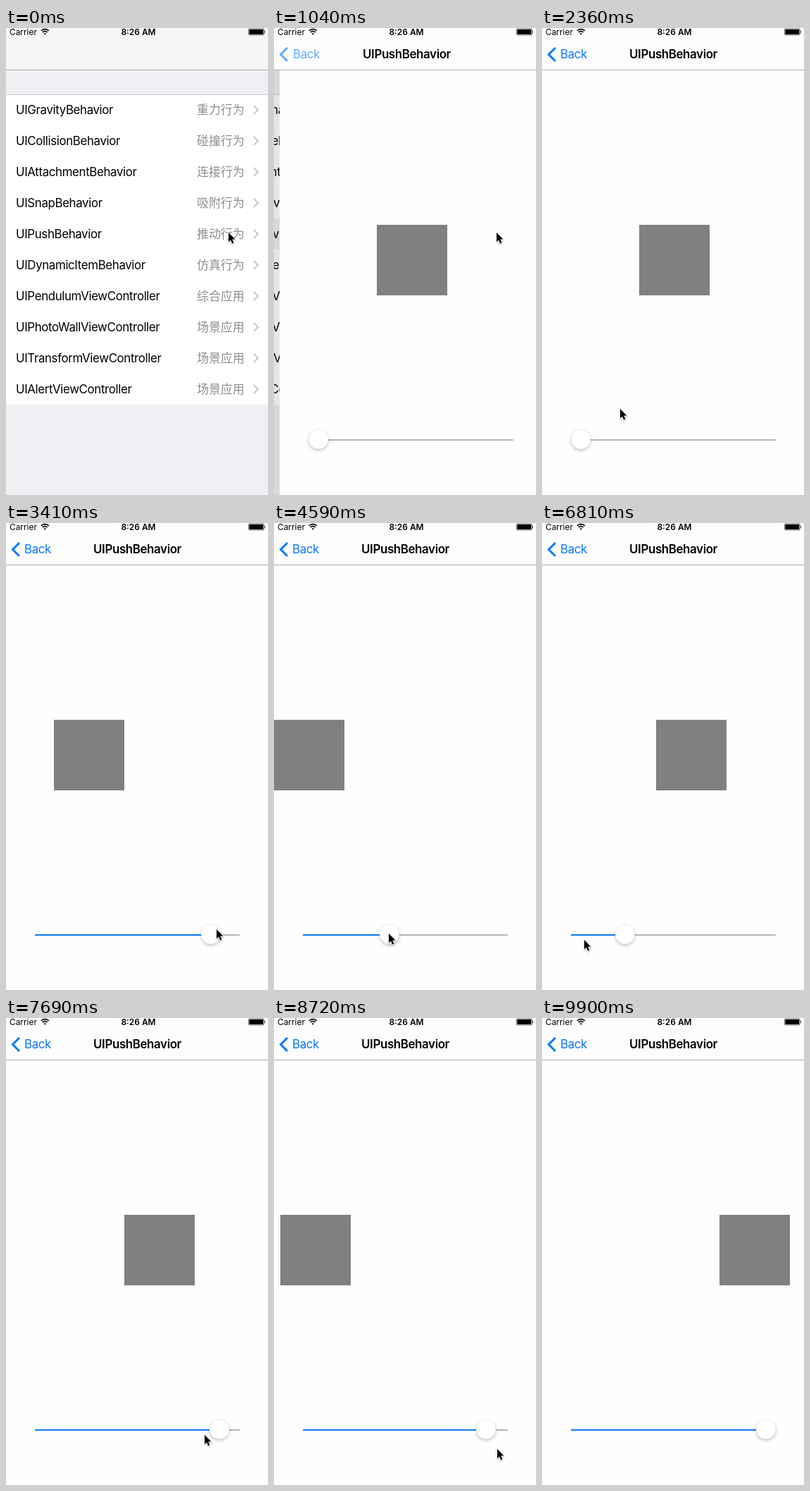
An HTML page that plays this animation: 372x662 px, repeating every 10000 ms.

```html
<!DOCTYPE html>
<html lang="zh-CN">
<head>
<meta charset="utf-8">
<title>Push behavior</title>
<style>
  html, body { margin: 0; width: 100%; height: 100%; overflow: hidden; background: #efeff4; }
  svg { display: block; width: 372px; height: 662px; }
  text { font: 16.9px Inter, "Noto Sans CJK SC", "Noto Sans CJK", sans-serif; letter-spacing: -.38px; }
  .detail { font-family: "Noto Sans CJK SC", "Noto Sans CJK", sans-serif; fill: #8e8e93; letter-spacing: 0; }
  .status { font-size: 11.9px; letter-spacing: 0; }
  .bold { font-weight: 600; }
  .mid { text-anchor: middle; }
  .blue { fill: #0a7aff; }
  .line { fill: none; stroke-width: 2; }
  #thumb { filter: drop-shadow(0 2px 2px rgba(0, 0, 0, .22)); }
  #cursor { filter: drop-shadow(0 1px 1px rgba(0, 0, 0, .3)); }
</style>
</head>
<body>
<svg viewBox="0 0 372 662">
  <g id="list">
    <rect width="372" height="662" fill="#efeff4"/>
    <rect y="94" width="372" height="1" fill="#c8c7cc"/>
    <rect y="95" width="372" height="439" fill="#fff"/>
    <rect id="picked" y="270" width="372" height="44" fill="#efefef"/>
    <g id="rows"></g>
  </g>
  <rect id="dim" width="372" height="662"/>

  <g id="page">
    <rect width="372" height="662" fill="#fefefe"/>
    <rect id="box" y="279" width="100" height="100" fill="#808080"/>
    <rect x="41" y="583" width="291" height="2" rx="1" fill="#b6b6b6"/>
    <rect id="fill" class="blue" x="41" y="583" height="2" rx="1"/>
    <g id="thumb">
      <circle cy="583" r="14" fill="#fff" stroke="#000" stroke-opacity=".1" stroke-width=".6"/>
    </g>
  </g>

  <rect width="372" height="59" fill="#f6f6f7"/>
  <rect id="bar" width="372" height="59" fill="#fdfdfd"/>
  <rect y="59" width="372" height="1" fill="#acacae"/>
  <g id="back">
    <path d="M19 28L9.5 37.5L19 47" class="line" stroke="#0a7aff" style="stroke-width:3"/>
    <text id="backText" class="blue" x="26" y="43">Back</text>
  </g>
  <text id="title" class="bold mid" x="186.5" y="43">UIPushBehavior</text>

  <text class="status" x="5" y="9.5">Carrier</text>
  <g class="line" stroke="#000" style="stroke-width:1.7">
    <path d="M49.8 3.8a7.8 7.8 0 0 1 11 0M51.9 6.1a4.8 4.8 0 0 1 6.8 0"/>
    <path d="M55.3 9.8l-1.7-1.7a2.4 2.4 0 0 1 3.4 0z" fill="#000" stroke="none"/>
  </g>
  <text class="status bold mid" x="188" y="9.5">8:26 AM</text>
  <rect x="344.3" y="1" width="22" height="9" rx="1.5" fill="none" stroke="#000" stroke-width=".6"/>
  <rect x="345.3" y="2" width="20" height="7" rx=".8"/>
  <path d="M367 3.6q1.8 1.9 0 3.8z"/>

  <path id="cursor" d="M0 0V13.2L3 10.4L5.1 15.6L7.4 14.6L5.2 9.6H9.4Z" stroke="#fff" stroke-width="1.4" paint-order="stroke"/>
</svg>
<script>
const LOOP = 10000, HOLD = 739, TICK = 147.6; // the picture steps once per tick
const WALL = 272;                              // travel of the square
const MIN = 55, MAX = 318;                     // travel of the thumb
const GRAB = 11.2, SWING = 19.8, PERIOD = 8.7, PEAK = 37.47, STOP = 54.5;
const $ = id => document.getElementById(id);

const names = ['Gravity', 'Collision', 'Attachment', 'Snap', 'Push', 'DynamicItem',
  'Pendulum', 'PhotoWall', 'Transform', 'Alert'];
const details = ['重力', '碰撞', '连接', '吸附', '推动', '仿真', '综合', '场景', '场景', '场景'];

$('rows').innerHTML = names.map((name, i) => {
  const y = 122 + 44 * i;
  const [kind, use] = i < 6 ? ['Behavior', '行为'] : ['ViewController', '应用'];
  return `<text x="14" y="${y}">UI${name}${kind}</text>
    <text class="detail" x="271" y="${y}">${details[i]}${use}</text>
    <path class="line" stroke="#c7c7cc" d="M351.8 ${y - 12}l6 6l-6 6"/>`;
}).join('');

const clamp = (v, lo = 0, hi = 1) => Math.min(hi, Math.max(lo, v));
const lerp = (a, b, u) => a + (b - a) * u;
const ease = (n, from, to) => (1 - Math.cos(Math.PI * clamp((n - from) / (to - from)))) / 2;
const bounce = d => WALL - Math.abs(WALL - d % (2 * WALL));

// Drift to the left wall, speed up to the right one, then bounce between both.
function boxX(n) {
  if (n < 26) return 138 * clamp((26 - n) / 14) ** 1.26;
  if (n < 39) return Math.min(WALL, 12.6 * (n - 26) + .86 * (n - 26) ** 2);
  return bounce(WALL + 55 * Math.min(n - 39, 16) + 32.6 * Math.max(0, n - 55));
}

const swing = (n, mid, reach, lead) =>
  mid + reach * Math.cos(2 * Math.PI * (Math.min(n, STOP) + lead - PEAK) / PERIOD);

function thumbX(n) {
  if (n < SWING) return lerp(MIN, MAX, ease(n, GRAB, SWING));
  return clamp(swing(n, 210.5, 111.7, 0), MIN, MAX);
}

// The pointer fetches the thumb, swings slightly ahead of it and leaves below.
function pointer(n) {
  if (n < GRAB) {
    const u = ease(n, 7, GRAB);
    return [lerp(316, MIN + 8, u), lerp(290, 598, u)];
  }
  if (n < SWING) return [thumbX(n) + 8, lerp(598, 573, ease(n, GRAB, SWING))];
  const y = Math.min(591, 573 + 1.4 * (n - SWING));
  return [swing(n, 189.3, 137.9, .33), y + 80 * ease(n, 53, 56)];
}

const move = (id, x, y = 0) => $(id).setAttribute('transform', `translate(${x} ${y})`);
const fade = (id, v) => $(id).setAttribute('opacity', v);

function draw(n) {
  const open = n >= 0;
  const t = n * TICK / 1000 + .02;
  const w = 18.26 * t;
  const p = open ? (1 + w) * Math.exp(-w) : 1; // critically damped slide

  move('page', Math.round(372 * p));
  move('list', open ? Math.round(-.3 * 372 * (1 - p)) : 0);
  fade('picked', open ? 1 : 0);
  fade('dim', .1 * (1 - p));
  fade('bar', 1 - p);
  fade('back', open ? Math.min(1, t / .5) : 0);
  fade('title', 1 - p);
  move('backText', 46 * p);
  move('title', 93 * p);

  const thumb = Math.round(thumbX(n));
  move('box', Math.round(boxX(n)));
  move('thumb', thumb);
  $('fill').setAttribute('width', thumb > MIN ? thumb - 41 : 0);
  move('cursor', ...pointer(n).map(Math.round));
}

let last = null;
const start = performance.now();
function loop() {
  const t = (performance.now() - start) % LOOP;
  const n = t < HOLD ? -1 : Math.min(62, Math.floor((t - HOLD) / TICK));
  if (n !== last) draw(last = n);
  requestAnimationFrame(loop);
}
loop();
</script>
</body>
</html>
```
